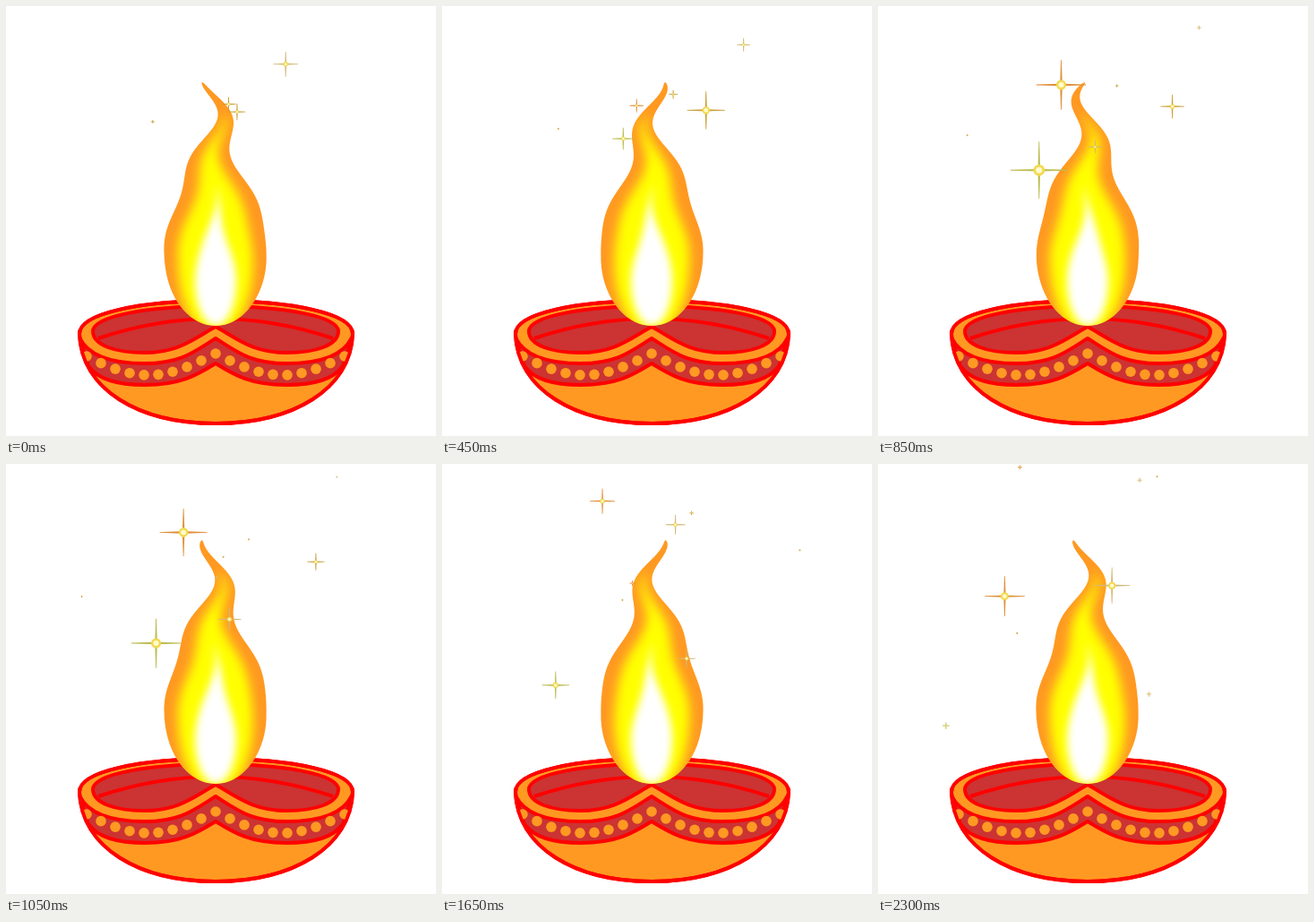
These frames come from a looping animation (480x480 px, 2.35 s). An HTML page with a canvas:

```html
<!DOCTYPE html>
<html lang="en">
<head>
<meta charset="utf-8">
<title>Diya lamp</title>
<style>
  html, body { margin: 0; width: 100%; height: 100%; overflow: hidden; background: #fff; }
  svg, canvas { position: absolute; left: 0; top: 0; width: 480px; height: 480px; }
</style>
</head>
<body>
<svg viewBox="0 0 480 480" fill="#ff9922" stroke="#f00" stroke-width="4" stroke-linejoin="round">
  <defs>
    <path id="bowl" d="M82 366C82 343 150 329 234 329S387 343 387 366C385 428 320 466 234 466S84 428 82 366Z"/>
    <clipPath id="inBowl"><use href="#bowl"/></clipPath>
  </defs>
  <use href="#bowl"/>
  <path fill="#cc3333" d="M97 363C97 346 160 335 234 335S371 346 371 363C371 379 345 387 314 387C275 387 258 371 234 358C210 371 193 387 154 387C123 387 97 379 97 363Z"/>
  <path fill="none" d="M103 371Q234 327 365 371"/>
  <g clip-path="url(#inBowl)">
    <path fill="#cc3333" d="M82 370C92 391 120 399 155 399C195 399 210 386 234 371C258 386 273 399 313 399C348 399 376 391 386 370L376 402C366 416 344 423 313 423C273 423 255 412 234 399C213 412 195 423 155 423C124 423 102 416 92 402Z"/>
    <g id="beads" stroke="none"></g>
  </g>
  <use href="#bowl" fill="none"/>
</svg>
<canvas id="stage" width="480" height="480"></canvas>
<script>
const LOOP = 2350, STEP = 50, SWAY = LOOP / 2, AXIS = 234, TIP = 85;
const ctx = document.getElementById('stage').getContext('2d');

// Beads hang in two mirrored arcs
let beads = '';
for (let i = -9; i <= 9; i++) {
  const y = 388 + 24 * Math.sin(Math.PI * Math.abs(i) * 16 / 150);
  beads += `<circle cx="${AXIS + i * 16}" cy="${y}" r="5.8"/>`;
}
document.getElementById('beads').innerHTML = beads;

const layers = [
  { color: '#ff9922', blur: 0, top: TIP, widest: 278, bottom: 357, width: 57, stem: 5 },
  { color: '#ffff00', blur: 6, top: 120, widest: 285, bottom: 368, width: 42, stem: 3 },
  { color: '#ffffff', blur: 4, top: 202, widest: 308, bottom: 357, width: 23, stem: 1 }
];

// Half width of a teardrop: a thin stem swelling to the widest row, then a round base
function halfWidth({ top, widest, bottom, width, stem }, y) {
  if (y > widest) return width * Math.sqrt(1 - ((y - widest) / (bottom - widest)) ** 2);
  const v = (y - top) / (widest - top);
  return width * (1 - Math.cos(Math.PI * v ** 1.15)) / 2 + stem * Math.sin(Math.PI * Math.sqrt(v));
}

// A wave climbs the flame and grows towards the tip
function centre(y, t) {
  const reach = Math.max(0, 1 - (y - TIP) / 230) ** 2;
  const peakTime = 1695 - 12.24 * (y - TIP);
  return AXIS + 16 * reach * Math.cos(2 * Math.PI * (t - peakTime) / SWAY);
}

function flamePath(layer, t) {
  const path = new Path2D();
  for (let y = layer.top; y <= layer.bottom; y++) path.lineTo(centre(y, t) + halfWidth(layer, y), y);
  for (let y = layer.bottom; y >= layer.top; y--) path.lineTo(centre(y, t) - halfWidth(layer, y), y);
  path.closePath();
  return path;
}

function drawFlame(t) {
  ctx.save();
  layers.forEach((layer, i) => {
    const path = flamePath(layer, t);
    ctx.filter = layer.blur ? `blur(${layer.blur}px)` : 'none';
    ctx.fillStyle = layer.color;
    ctx.fill(path);
    if (i === 0) ctx.clip(path);
  });
  ctx.restore();
}

// colour, birth, death, size, from, to, bend of the path at mid-life
const GOLD = '#c9a03a', OLIVE = '#bcbc50', ORANGE = '#e0903c', PALE = '#d3b877';
const sparks = [
  [PALE, -500, 1100, 15, [285, 89], [372, 12]],
  [GOLD, -200, 1700, 24, [242, 118], [404, 95], [-3, 7]],
  [GOLD, -350, 1100, 9, [241, 118], [272, 83]],
  [GOLD, -400, 1110, 2, [194, 122], [80, 149]],
  [OLIVE, 200, 2600, 32, [215, 125], [50, 311], [12, 10]],
  [ORANGE, 300, 2500, 30, [222, 120], [152, -8]],
  [PALE, 600, 2650, 16, [234, 136], [320, 275], [-5, 10]],
  [PALE, 1000, 2600, 14, [233, 132], [308, 0], [-3, -11]],
  [GOLD, 950, 2400, 3.5, [236, 113], [316, 9], [4, -8]],
  [ORANGE, 1600, 3300, 29, [218, 132], [32, 170]],
  [GOLD, 1600, 2600, 3, [205, 149], [134, 206]],
  [PALE, 1880, 3500, 21, [243, 130], [313, 152]]
];
const PEAK = 0.27;

function drawSpark([color, birth, death, peak, from, to, bend = [0, 0]], t) {
  const u = (t - birth) / (death - birth);
  if (u <= 0 || u >= 1) return;
  const [x, y] = from.map((p, i) => p + (to[i] - p) * u + 4 * bend[i] * u * (1 - u));
  const glow = u < PEAK ? u / PEAK : ((1 - u) / (1 - PEAK)) ** 1.2;
  const size = Math.max(1, peak * glow), core = size * 0.2, arm = Math.min(0.5 + size * 0.03, 1.3);

  ctx.save();
  ctx.translate(x, y);
  ctx.fillStyle = color;
  for (let i = 0; i < 4; i++) {
    ctx.beginPath();
    ctx.moveTo(-arm, 0);
    ctx.lineTo(-0.4, -size);
    ctx.lineTo(0.4, -size);
    ctx.lineTo(arm, 0);
    ctx.fill();
    ctx.rotate(Math.PI / 2);
  }
  for (const [radius, fill] of [[core, '#f3d94f'], [core * 0.55, '#fffbd0']]) {
    ctx.fillStyle = fill;
    ctx.beginPath();
    ctx.arc(0, 0, radius, 0, 2 * Math.PI);
    ctx.fill();
  }
  ctx.restore();
}

const began = performance.now();
function render() {
  const t = Math.floor((performance.now() - began) % LOOP / STEP) * STEP;
  ctx.clearRect(0, 0, 480, 480);
  drawFlame(t);
  sparks.forEach(spark => drawSpark(spark, t));
  requestAnimationFrame(render);
}
render();
</script>
</body>
</html>
```
